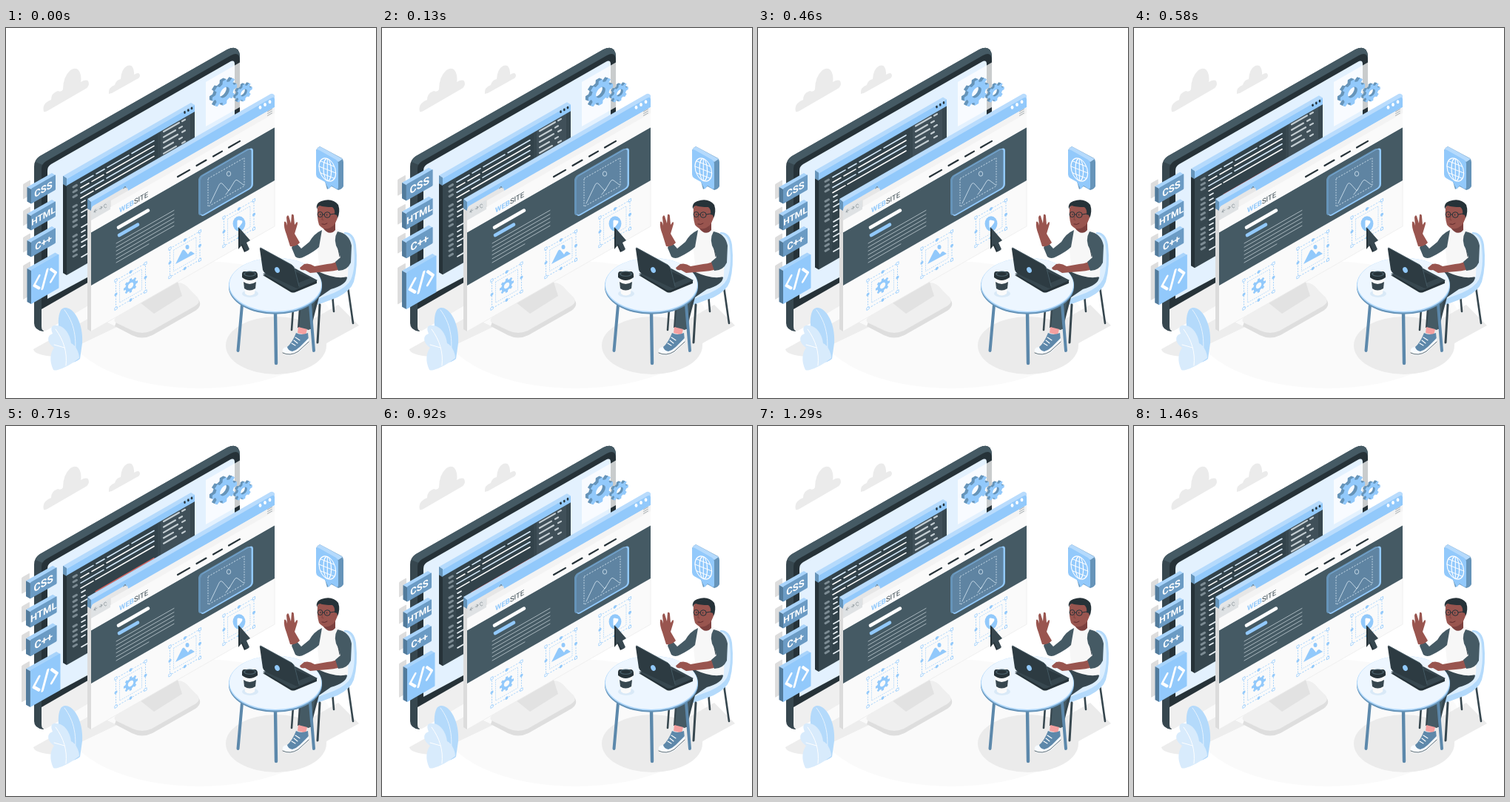
These frames come from a looping animation (500 by 500 pixels, 1.5 s). An HTML page:

```html
<!DOCTYPE html>
<html lang="en">
<head>
<meta charset="utf-8">
<title>Web development</title>
<style>
html, body { margin: 0; width: 100%; height: 100%; overflow: hidden; background: #fff; }
svg { display: block; width: 100vw; height: 100vh; }
text { font-family: Roboto, "Open Sans", sans-serif; font-weight: 700; }
</style>
</head>
<body>
<svg id="stage" viewBox="0 0 500 500"></svg>
<script>
const BLUE = '#92c9fb', DEEP = '#6694b9', SLATE = '#455a64', NAVY = '#37474f', INK = '#263238';
const SKIN = '#99554f', SHADE = '#7d413f', PALE = '#e3f1fe';
const SLOPE = .572;

const path = (d, fill, extra = '') => `<path d="${d}" fill="${fill}" ${extra}/>`;
const stroke = (d, color, w = 1, extra = '') =>
  path(d, 'none', `stroke="${color}" stroke-width="${w}" stroke-linecap="round" stroke-linejoin="round" ${extra}`);
const oval = (x, y, rx, ry, fill, extra = '') =>
  `<ellipse cx="${x}" cy="${y}" rx="${rx}" ry="${ry}" fill="${fill}" ${extra}/>`;
const rect = (x, y, w, h, fill, r = 0, extra = '') =>
  `<rect x="${x}" y="${y}" width="${w}" height="${h}" rx="${r}" fill="${fill}" ${extra}/>`;
// Places flat content on the wall plane that rises to the right.
const wall = (x, y, body) => `<g transform="matrix(1 ${-SLOPE} 0 1 ${x} ${y})">${body}</g>`;
const bar = (x, y, w, color, sw, extra) => stroke(`M${x} ${y}l${w} ${-w * SLOPE}`, color, sw, extra);

function gearPath(r, teeth, hole) {
  let d = '';
  for (let i = 0; i < teeth; i++) {
    [[-.3, .76], [-.2, 1], [.2, 1], [.3, .76]].forEach(([off, k]) => {
      const a = (i + off) / teeth * 2 * Math.PI;
      d += `${d ? 'L' : 'M'}${(Math.cos(a) * r * k).toFixed(2)} ${(Math.sin(a) * r * k).toFixed(2)}`;
    });
  }
  return d + `ZM${hole} 0A${hole} ${hole} 0 1 0 ${-hole} 0A${hole} ${hole} 0 1 0 ${hole} 0Z`;
}
const gear = (x, y, r, n, hole, fill) => wall(x, y, path(gearPath(r, n, hole), fill, 'fill-rule="evenodd"'));
function thickGear(x, y, r, n, hole, depth) {
  let s = '';
  for (let i = depth; i > 0; i--) s += gear(x - i, y - i * .4, r, n, hole, DEEP);
  return s + gear(x, y, r, n, hole, BLUE);
}

function floor() {
  return oval(262, 401, 180, 86, '#fafafa') +
    path('M37 434L118 389L150 404L66 444Q38 442 37 434Z', '#ededed') +
    path('M400 402L449 374L477 402L422 432Z', '#ebebeb') +
    oval(365, 429, 68, 39, '#ebebeb');
}

function clouds() {
  return path('M51 113Q48 102 61 97Q61 88 70 85Q75 87 77 83Q77 66 87 57Q98 50 101 64Q102 70 101 73Q112 67 112 76Q111 81 106 83L56 112Q52 114 51 113Z', '#ebebeb') +
    path('M139 89Q138 80 147 77Q149 70 155 69Q156 55 164 51Q172 48 173 60L173 63Q181 58 181 65Q180 68 177 69L143 88Z', '#ebebeb');
}

function monitor() {
  return path('M150 394L220 350Q232 342 244 349L260 367Q266 375 256 382L198 415Q184 422 170 415L147 403Z', '#dedede') +
    path('M150 390L222 347Q232 341 242 347L259 364Q264 371 255 376L197 409Q184 415 171 409L148 398Q144 394 150 390Z', '#efefef') +
    path('M180 370L231 340L238 362L200 386Z', '#e2e2e2') +
    path('M38 187Q38 178 46 173L299 29Q314 22 316 37L316 240L50 410Q38 408 38 399Z', NAVY) +
    path('M46 173L299 29Q314 22 316 37L316 44L311 39L52 186L40 181Q42 175 46 173Z', SLATE) +
    path('M48 190Q48 184 54 180L304 37Q316 31 316 44L316 240L48 396Z', INK) +
    path('M56 193Q56 187 61 184L302 46Q309 42 309 49L309 230L56 366Z', PALE) +
    path('M48 380L180 304L180 334L56 408Q48 412 48 403Z', '#efefef') +
    path('M270 73L316 46.5L316 107L270 133Z', '#fff', 'opacity=".75"');
}

function codeWindow() {
  let s = path('M77 200L82 203L82 334L77 331Z', INK) +
    path('M82 211L255 111L255 235L82 334Z', NAVY) +
    path('M100 203L205 143L205 250L100 310Z', '#32424a') +
    path('M209 138L249 115L249 205L209 228Z', '#405059') +
    path('M77 200L250 101L255 104L82 204Z', '#b5dafc') +
    path('M77 200L82 203L82 214L77 211Z', DEEP) +
    path('M82 204L255 104L255 113L82 213Z', BLUE);
  [241.5, 246.3, 251].forEach((x, i) => s += oval(x, 114 - i * 2.8, 1.3, 1.9, INK));

  const rows = [
    [[101, 17], [122, 11], [137, 29], [170, 30]],
    [[101, 11], [116, 16], [136, 64]],
    [[101, 31], [136, 64]],
    [[101, 17], [121, 79]]
  ];
  rows.forEach((segs, i) => segs.forEach(([x, w]) =>
    s += bar(x, 209 + i * 7 - (x - 101) * SLOPE, w, i % 2 ? '#ffffff' : '#d5e9fa', 1.6)));
  s += bar(121, 234.7, 79, '#e2655f', 1.4);

  for (let i = 0; i < 16; i++) {
    const y = 215 + i * 6.7;
    if (i % 6 !== 3) s += bar(91, y, 4.5, '#7d8c94', 3);
    if (i > 3 && i % 6 !== 2) s += bar(102, y - 6, i % 3 ? 5 : 11, '#e5edf2', 1.8);
  }
  for (let i = 0; i < 5; i++) {
    const y = 140 + i * 7.4;
    s += bar(213, y, [21, 16, 19, 13, 17][i], '#c3cdd2', 2.2);
    s += bar(i % 2 ? 234 : 238, y - (i % 2 ? 12 : 14), 4, '#c3cdd2', 2.2);
  }
  return s;
}

function selection(x, y, w, h) {
  let s = rect(0, 0, w, h, 'none', 0, `stroke="${BLUE}" stroke-width=".8" stroke-dasharray="2 1.6"`) +
    rect(5, 5, w - 10, h - 10, 'none', 0, `stroke="${BLUE}" stroke-width=".6" stroke-dasharray="1.4 1.2"`);
  for (let i = 0; i < 3; i++) for (let j = 0; j < 3; j++) {
    if (i === 1 && j === 1) continue;
    const mid = i === 1 || j === 1;
    s += rect(i * w / 2 - 1.6, j * h / 2 - 1.6, 3.2, 3.2, mid ? BLUE : '#fff', mid ? 1.6 : .4,
      `stroke="${BLUE}" stroke-width=".8"`);
  }
  return wall(x, y, s);
}

function browser() {
  let s = path('M110 232L115 235L115 410L110 407Z', '#dcdcdc') +
    path('M115 247L363 105L363 268L115 410Z', '#fafafa') +
    stroke('M115 410L363 268V207', '#ececec', .8) +
    path('M115 276.3L363 134.3L363 206L115 348Z', SLATE) +
    path('M110 231L356 90Q360 87 363 91L363 94L115 236Z', '#b9dcfd') +
    path('M110 231L115 235L115 247L110 244Z', DEEP) +
    path('M115 235L358 95Q363 92 363 96L363 107L115 249Z', BLUE) +
    path('M115 245L116 243Q116 241 120 239L158 217Q164 213 165 219L166 221L166 230L115 260Z', '#e6e6e6') +
    path('M142 233L363 107L363 117L142 244Z', '#f3f3f3') +
    path('M115 257L363 115L363 134.3L115 276.3Z', '#fafafa') +
    path('M115 247L141 232L141 245L115 260Z', '#dfe2e4');
  [343.5, 350, 356.5].forEach((x, i) => s += oval(x, 107.3 - i * 3.8, 1.9, 2.5, '#fff'));
  for (let i = 0; i < 3; i++) s += bar(353.5, 113 + i * 2.7, 6, '#9da5a9', .9);

  s += stroke('M123 246L119 248.5M121 245L119 248.5L121 249', '#8f989d', .8) +
    stroke('M126 244.5L130 242M128 241.5L130 242L128 245', '#8f989d', .8) +
    stroke('M136 239A2 2.4 0 1 0 136 242', '#8f989d', .8) +
    stroke('M159 217L161 214L162 216', '#6b7b84', .9);
  s += wall(153, 250, `<text font-size="9.6" fill="${BLUE}">WEB<tspan fill="${NAVY}" font-weight="400">SITE</tspan></text>`);
  [[232, 201, 16], [257.5, 186, 13], [280, 173.5, 12], [301, 161.5, 15]].forEach(([x, y, w]) =>
    s += bar(x, y, w, INK, 2.2));

  s += bar(152, 269.5, 40, '#fff', 4.6) + bar(153, 280, 25, BLUE, 4.6);
  for (let i = 0; i < 6; i++) s += bar(149, 291 + i * 5.2, i < 5 ? 78 : 44, '#b3c0c7', .9);

  s += wall(260, 201, rect(0, 0, 70, 54, DEEP, 5)) +
    wall(263, 201, rect(0, 0, 71, 55, BLUE, 5)) +
    wall(263, 201.5, rect(0, 0, 68.5, 52.5, '#5f84a2', 4)) +
    wall(273, 203.5, rect(0, 0, 49, 38, 'none', 0, 'stroke="#d7e7f3" stroke-width=".7" stroke-dasharray="2 1.5"')) +
    stroke('M276 237L288 212Q290 208 293 211L301 220L309 207Q311 204 313 206L321 212M297 225L303 217', '#d7e7f3', .8) +
    oval(301, 197, 2.7, 3.2, 'none', 'stroke="#d7e7f3" stroke-width=".8"');

  s += selection(148.5, 341, 40, 38) + gear(168.5, 348, 9.6, 8, 3.7, BLUE) +
    selection(221.5, 298, 40.5, 38.5) +
    path('M229 319L238 301Q240 298 242 301L246 306L248 303Q250 301 252 303L255 305Z', BLUE) +
    oval(245, 296, 2.5, 3, BLUE) +
    selection(294.5, 256, 40.5, 38.5) + oval(315, 264.5, 8.4, 10.2, BLUE) +
    path('M312.5 261Q312.5 259 314.5 259.5L319 260.5Q320 261.5 319 263.5L314.5 269.5Q312.5 270.5 312.5 268.5Z', '#fff');
  s += path('M314 269L329 287L323 290L328 300L322 303L318 294L314 299Z', INK) +
    path('M316 271L330 287L325 290L329 299L324 302L319 292L316 296Z', NAVY);
  return s;
}

const gears = () => thickGear(295.5, 87, 16.8, 8, 6.4, 4) + thickGear(321.5, 87.5, 11.4, 8, 4.3, 3);

function badge(label, y, w, h, size, face) {
  const half = w / 2;
  let s = wall(23, y - 6, rect(0, 0, 10, h, '#dddddd', 1)) +
    path(`M28.5 ${y - 2}L${29 + w} ${y - 2 - w * SLOPE}L${34 + w} ${y - w * SLOPE + 1}L34 ${y + 1}Z`, '#a9d4fb') +
    path(`M28.5 ${y - 2}L34 ${y + 1}L34 ${y + h}L28.5 ${y + h - 3}Z`, '#527b9c') +
    wall(34, y, rect(0, 0, w, h, face, 1));
  if (label) {
    s += wall(34, y, `<text x="${half}" y="${h / 2 + size * .36}" text-anchor="middle" font-size="${size}" font-weight="900" fill="#fff">${label}</text>`);
  } else {
    s += wall(34, y, stroke(`M11 14L4 23L11 31M${w - 11} 14L${w - 4} 23L${w - 11} 31M22 12L15 34`, '#fff', 3.2));
  }
  return s;
}
function badges() {
  const face = '#6b9bc4';
  return badge('CSS', 217, 33, 20.5, 13, face) + badge('HTML', 253, 33, 20.5, 12, face) +
    badge('C++', 289, 33, 20.5, 13, face) + badge('', 327, 37.5, 46, 0, BLUE);
}

function plant() {
  return path('M82 452C73 425 66 392 75 380C86 371 105 393 103 426L100 447Q92 454 82 452Z', '#b4dafb') +
    stroke('M79 381C92 398 97 420 92 449', '#e7f3fe', 1) +
    path('M64 462C58 449 60 439 65 432C56 426 54 416 63 413C59 404 63 401 68 402C80 402 87 416 88 426C95 429 99 440 99 446Q84 458 70 462Q66 463 64 462Z', '#d8ebfc') +
    stroke('M67 407C78 422 83 438 81 456M65 428L79 432', '#fff', 1);
}

function bubble() {
  return path('M419 165Q420 162 424 160L454 176Q456 178 456 181L456 214Q454 218 449 219L440 214L434 218Z', DEEP) +
    path('M419 165Q420 162 424 160L455 177L449 181Z', '#b5dafc') +
    path('M419 167Q419 163 423 165L446 178Q449 180 449 184L449 215Q449 219 446 217L440 213L436 218L431 208L422 203Q419 201 419 198Z', BLUE) +
    `<g transform="matrix(1 .4 0 1 434.3 191.5)">` +
    [11.3, 5.3].map(r => oval(0, 0, r, 15, 'none', 'stroke="#fff" stroke-width="1.2"')).join('') +
    stroke('M0 -15V15M-11.3 0H11.3M-9.3 -8H9.3M-9.3 8H9.3', '#fff', 1.1) + '</g>';
}

function chair() {
  return stroke('M389 365L386 408M462 350L469 399M441 360L443 383', NAVY, 2.6) +
    path('M457 276Q470 275 473 293Q476 322 470 343Q466 355 448 364L421 374Q405 372 400 360L452 335Z', '#b4dafb') +
    path('M456 278Q468 278 470 295Q473 324 466 340Q461 350 443 358L419 367L402 357L454 334Z', '#dceefe') +
    stroke('M424 374L421 425', NAVY, 3);
}

function man() {
  return path('M417 330Q448 323 461 337Q460 347 439 353L423 364Q417 386 412 407L394 405Q396 378 397 359Q403 342 417 330Z', NAVY) +
    path('M398 350Q411 344 425 346L419 363L410 408L396 406L399 370Z', SLATE) +
    path('M395 404L407 407L405 415L394 412Z', '#f4a0a0') +
    path('M392 412Q399 416 408 412L409 422Q402 430 395 437Q385 443 376 440Q372 436 380 431Q387 425 392 412Z', '#5e88aa') +
    path('M374 434Q376 431 380 431Q381 436 387 437Q393 435 397 431L409 419V424Q402 433 396 438Q384 445 376 441Q373 438 374 434Z', '#f7fbff') +
    stroke('M374 439Q384 444 395 437L409 424', NAVY, .8) +
    stroke('M386 426L391 429M389 422L394 426M391 418L397 422', '#fff', 1.1) +
    // torso and raised arm
    path('M423 275Q437 267 453 274Q464 283 463 302L462 336Q446 340 424 330L421 299Z', '#f7f7f7') +
    path('M427 273Q416 278 410 289L399 298L390 288L386 297L391 309Q396 313 403 309Q417 302 423 296Z', SLATE) +
    path('M384 295L379 279Q375 269 376 262Q378 260 380 267L379 256Q380 252 382 254L385 264L386 252Q389 251 389 255L390 266L393 262Q395 262 393 268L390 278L397 290Q392 296 384 295Z', SKIN) +
    // head
    path('M427 260L428 270Q437 282 445 273L445 255Z', SHADE) +
    path('M421 243Q420 257 423 266Q429 274 438 270Q447 266 448 253Q448 242 437 237L424 238Z', SKIN) +
    path('M420 245Q418 237 426 234Q441 229 449 239Q452 248 448 257L444 252Q445 245 441 242Q430 242 424 240Q421 241 420 245Z', INK) +
    oval(445.2, 256, 2.5, 3.7, SKIN) +
    oval(424.5, 252, 3.4, 3.6, 'none', `stroke="${INK}" stroke-width="1"`) +
    oval(434.2, 252.5, 4, 3.8, 'none', `stroke="${INK}" stroke-width="1"`) +
    stroke('M428 252H430M438 252L444 251', INK, 1) +
    oval(425, 252, .7, .9, INK) + oval(433.6, 252.5, .7, .9, INK) +
    stroke('M428 254L426.8 259L429 259.5', SHADE, .9) +
    stroke('M427 265Q431 266.5 434 264', '#5f2c2e', 1);
}

function frontArm() {
  return path('M450 312Q447 318 434 319L417 322Q410 317 403 319L397 324Q398 328 404 327L411 331L435 329Q451 328 456 323Z', SKIN) +
    path('M448 275Q464 278 467 294L466 317Q461 328 449 328L445 316L452 310L449 300Q441 287 448 275Z', SLATE) +
    stroke('M449 299L451 309', NAVY, .9);
}

function table() {
  return stroke('M319 374L313.5 436M411 374L416 436', '#5c88ab', 4) +
    stroke('M364 384L365 453', '#5c88ab', 4.4) +
    oval(364, 350, 63, 36.7, DEEP) + oval(364, 347.5, 63, 37, '#b0d8fb') + oval(364, 346.7, 62, 36.2, '#edf6ff');
}

function laptop() {
  return path('M347 334L385 357Q388 358 391 357L420 345V341L390 326Z', INK) +
    path('M347 332L385 354Q388 355 391 354L421 341L391 325Z', NAVY) +
    path('M361 334L389 347L411 338L388 328Z', '#2b3940') +
    path('M343 299Q342 296 346 298L386 320Q389 322 390 325L396 350Q395 353 391 351L351 332Q348 330 347 327Z', '#2d3b42') +
    stroke('M344 297L386 320Q389 322 390 325L396 349', SLATE, 1) +
    oval(366.5, 327, 3.2, 4, BLUE, 'transform="rotate(-25 366.5 327)"');
}

function cup() {
  return oval(330, 359, 11, 5, '#d9e9f7') +
    path('M320 337L323 359Q329 364 336 359L339 337Z', '#fafafa') +
    path('M321 343Q329 349 338 343L337 352Q329 357 322 352Z', NAVY) +
    path('M319 333Q319 329 322 329H337Q340 330 340 334V337Q329 345 319 337Z', INK) +
    oval(329.5, 332.3, 8.5, 3.7, SLATE) + oval(329.5, 332.3, 6.5, 2.5, INK);
}

const stage = document.getElementById('stage');
stage.innerHTML = floor() + clouds() + monitor() +
  `<g id="code">${codeWindow()}</g>` + browser() + gears() +
  `<g id="badges">${badges()}</g>` + plant() + bubble() +
  chair() + man() + table() + laptop() + frontArm() + cup();

const code = document.getElementById('code');
const tags = document.getElementById('badges');
const LOOP = 1500, BEAT = 540, PULSE = 300;

function draw(t) {
  const lift = 11 * (1 - Math.cos(t / LOOP * 2 * Math.PI)) / 2;
  code.setAttribute('transform', `translate(0 ${-lift})`);
  const beat = t % BEAT;
  const active = t < 2 * BEAT && beat < PULSE;
  const k = 1 + (active ? .085 * Math.sin(beat / PULSE * Math.PI) ** 2 : 0);
  tags.setAttribute('transform', `translate(47 287) scale(${k}) translate(-47 -287)`);
}

const start = performance.now();
function tick() {
  draw((performance.now() - start) % LOOP);
  requestAnimationFrame(tick);
}
draw(0);
requestAnimationFrame(tick);
</script>
</body>
</html>
```
